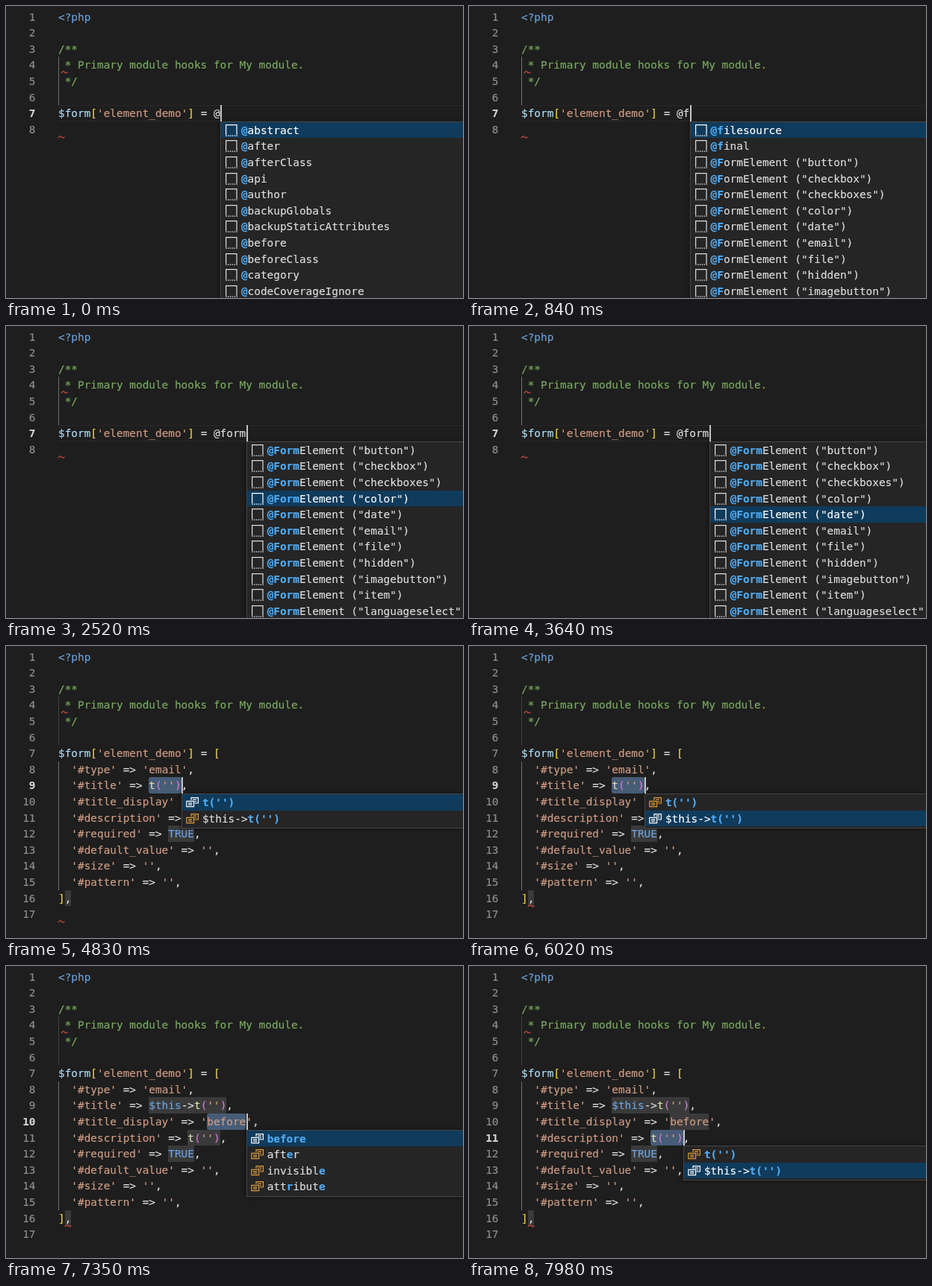
Write an HTML page that moves like this. It is 612 px wide and 392 px high and loops after 8 s.

```html
<!DOCTYPE html>
<html lang="en">
<head>
<meta charset="utf-8">
<title>Editor completion</title>
<style>
  html, body { margin: 0; width: 100%; height: 100%; overflow: hidden; background: #1e1e1e; }
  #stage {
    position: relative; width: 612px; height: 392px; overflow: hidden;
    background: #1e1e1e; color: #dedede;
    font: 14.4px/21.6px "DejaVu Sans Mono", "Liberation Mono", monospace;
    white-space: pre; font-variant-ligatures: none; -webkit-text-stroke: .15px;
  }
  #stage > *, .row > * { position: absolute; }
  .num, .code, .row span { margin-top: 1px; }
  .num { left: 0; width: 39.5px; text-align: right; color: #8e8e8e; }
  .num.on { color: #d4d4d4; font-weight: bold; }
  .current { left: 70px; right: 0; height: 19.6px; border: solid #292929; border-width: 1px 0; }
  .guide { left: 70px; width: 1px; background: #404040; }
  .guide.on { background: #707070; }
  .box { height: 21.6px; background: #3a3a3a; }
  .box.sel { background: #475c77; border-radius: 3px; }
  .cursor { width: 2px; height: 21.6px; background: #c4c5c3; }
  .popup {
    width: 430px; padding-bottom: 2px; background: #252526;
    border: 1px solid #454545; box-shadow: 0 0 6px 1px rgba(0, 0, 0, .35);
  }
  .row { position: relative; height: 21.6px; }
  .row.on { background: #0f3b5c; color: #fff; }
  .row svg { left: 4.6px; top: 2px; }
  .row span { left: 26.5px; }
  .row b { color: #4fadf7; }
  svg { fill: none; overflow: visible; }
  .comment { color: #7bac61; }
  .string { color: #d09c83; }
  .keyword { color: #6ca3dc; }
  .variable { color: #b0dffc; }
  .square { color: #f9d849; }
  .paren { color: #d07bd5; }
  .call { color: #e2e2b4; }
</style>
</head>
<body>
<div id="stage"></div>
<script>
const LOOP = 8000, CHAR = 8.67, LINE = 21.6, LEFT = 70;
const stage = document.getElementById('stage');
const colX = col => LEFT + col * CHAR;
const lineY = line => 3.6 + (line - 1) * LINE;

const header = ['<?php', '', '/**', ' * Primary module hooks for My module.', ' */', ''];
const assignment = "$form['element_demo'] = ";
const element = name => `@FormElement ("${name}")`;
const elements = ['button', 'checkbox', 'checkboxes', 'color', 'date', 'email', 'file',
  'hidden', 'imagebutton', 'item', 'languageselect'].map(element);
const tags = ['abstract', 'after', 'afterClass', 'api', 'author', 'backupGlobals',
  'backupStaticAttributes', 'before', 'beforeClass', 'category', 'codeCoverageIgnore'].map(t => '@' + t);

// Square brackets mark the matched letters of a choice.
const translate = ["[t('')]", "$this->[t('')]"];
const placement = ['[before]', 'aft[e]r', 'invisibl[e]', 'att[r]ibut[e]'];
const matched = (items, n) => items.map(s => `[${s.slice(0, n)}]${s.slice(n)}`);

const typing = (typed, n = typed.length) => ({
  typed, cursor: 1, sel: 0, col: assignment.length + n,
  list: matched(n === 1 ? tags : n === 2 ? ['@filesource', '@final', ...elements] : elements, n)
});
const field = (line, col, list) => ({ line, col, list, sel: 0, cursor: 1 });

const steps = [
  [0, { line: 7, title: "t('')", error: [8, 0], ...typing('@') }],
  [280, { cursor: 0 }],
  [840, typing('@f')],
  [910, { typed: '@fo' }],
  [980, typing('@fo')],
  [1050, { typed: '@for' }],
  [1120, typing('@for')],
  [1190, typing('@form')],
  [1680, { cursor: 0 }],
  [2170, { sel: 1 }],
  [2240, { cursor: 1 }],
  [2380, { sel: 2 }],
  [2520, { sel: 3 }],
  [2730, { cursor: 0 }],
  [3220, { cursor: 1 }],
  [3640, { sel: 4 }],
  [3780, { sel: 5, cursor: 0 }],
  [4270, { cursor: 1 }],
  [4830, { typed: '', error: [17, 0], ...field(9, 19, translate) }],
  [5320, { cursor: 0 }],
  [5600, { error: [16, 1] }],
  [5810, { cursor: 1 }],
  [6020, { sel: 1 }],
  [6370, { title: "$this->t('')", ...field(10, 29, placement) }],
  [6650, { sel: 1 }],
  [6860, { cursor: 0 }],
  [7210, { sel: 0 }],
  [7350, { cursor: 1 }],
  [7560, field(11, 25, translate)],
  [7980, { sel: 1 }]
];
let merged = {};
const states = steps.map(([at, change]) => ({ at, ...(merged = { ...merged, ...change }) }));

const escapeText = s => s.replace(/&/g, '&amp;').replace(/</g, '&lt;').replace(/>/g, '&gt;');
const span = (kind, s) => `<span class="${kind}">${escapeText(s)}</span>`;

function kindOf(token) {
  if (token[0] === "'") return 'string';
  if (/^[[\]]/.test(token)) return 'square';
  if (/^[()]/.test(token)) return 'paren';
  if (token === 't') return 'call';
  return /^(\$this|TRUE|<\?php)$/.test(token) ? 'keyword' : 'variable';
}

function highlight(text) {
  if (/^( \*|\/\*)/.test(text)) return span('comment', text);
  return text.split(/('[^']*'|\$\w+|[[\]()]|\bt(?=\()|TRUE|<\?php)/)
    .map((s, i) => i % 2 ? span(kindOf(s), s) : escapeText(s)).join('');
}

function codeLines(s) {
  if (s.typed) return [...header, assignment + s.typed, ''];
  const options = [['type', "'email'"], ['title', s.title], ['title_display', "'before'"],
    ['description', "t('')"], ['required', 'TRUE'], ['default_value', "''"], ['size', "''"], ['pattern', "''"]];
  return [...header, assignment + '[',
    ...options.map(([key, value]) => `  '#${key}' => ${value},`), '],', ''];
}

const block = (kind, x, y, style = '', body = '') =>
  `<div class="${kind}" style="left:${x}px;top:${y}px;${style}">${body}</div>`;

const guide = (from, to, on) =>
  block('guide' + (on ? ' on' : ''), LEFT, lineY(from), `height:${(to - from + 1) * LINE}px`);

const squiggle = (x, y) => `<svg width="9" height="4" style="left:${x}px;top:${y}px">
  <path d="M0 3.2Q2.4 -.8 4.4 1.8T8.4 1.6" stroke="#e0503f" stroke-width="1.1"/></svg>`;

const snippetIcon = () => `<svg width="17" height="17" stroke="currentColor" stroke-width="1.2">
  <path d="M1.6 15V1.6H16V15"/><path d="M1 16.2H17" stroke-dasharray="1.6 1.3"/></svg>`;

const valueIcon = on => `<svg width="17" height="17" stroke="${on ? '#fff' : '#dd9a3c'}" stroke-width="1.2">
  <path d="M7 6V2.6H16.4V10H11.5M9.2 5.2H14M11.8 7.6H14"/>
  <path d="M.8 7.4H10.6V14.6H.8ZM3 9.8H8.4M3 12.2H8.4"/></svg>`;

function popup(s) {
  const rows = s.list.map((item, i) => {
    const on = i === s.sel;
    const label = escapeText(item).replace(/\[/g, '<b>').replace(/\]/g, '</b>');
    return `<div class="row${on ? ' on' : ''}">${s.typed ? snippetIcon() : valueIcon(on)}<span>${label}</span></div>`;
  });
  return block('popup', colX(s.col) + .7, lineY(s.line + 1) + .1, '', rows.join(''));
}

function placeholders(s) {
  return [[9, 14, s.title.length], [10, 23, 6], [11, 20, 5], [12, 17, 4], [16, 1, 1]]
    .map(([line, col, n]) => block(line === s.line ? 'box sel' : 'box', colX(col), lineY(line), `width:${n * CHAR}px`))
    .join('');
}

function draw(s) {
  const text = codeLines(s).map((code, i) => {
    const line = i + 1, y = lineY(line);
    return block('num' + (line === s.line ? ' on' : ''), 0, y, '', line) + block('code', LEFT, y, '', highlight(code));
  }).join('');
  const cursorCol = s.typed ? assignment.length + s.typed.length : s.col;
  const [errorLine, errorCol] = s.error;
  stage.innerHTML =
    (s.typed ? block('current', LEFT, lineY(7)) : placeholders(s) + guide(8, 15, true)) +
    guide(4, 6, !!s.typed) + text +
    squiggle(74, lineY(4) + 18.6) +
    squiggle(colX(errorCol) + .2, lineY(errorLine) + 18.9) +
    popup(s) +
    (s.cursor ? block('cursor', Math.ceil(colX(cursorCol)), lineY(s.line)) : '');
}

let start, shown;
function tick(now) {
  start ??= now;
  const time = (now - start) % LOOP;
  const state = states.findLast(s => s.at <= time);
  if (state !== shown) draw(shown = state);
  requestAnimationFrame(tick);
}
draw(shown = states[0]);
requestAnimationFrame(tick);
</script>
</body>
</html>
```
